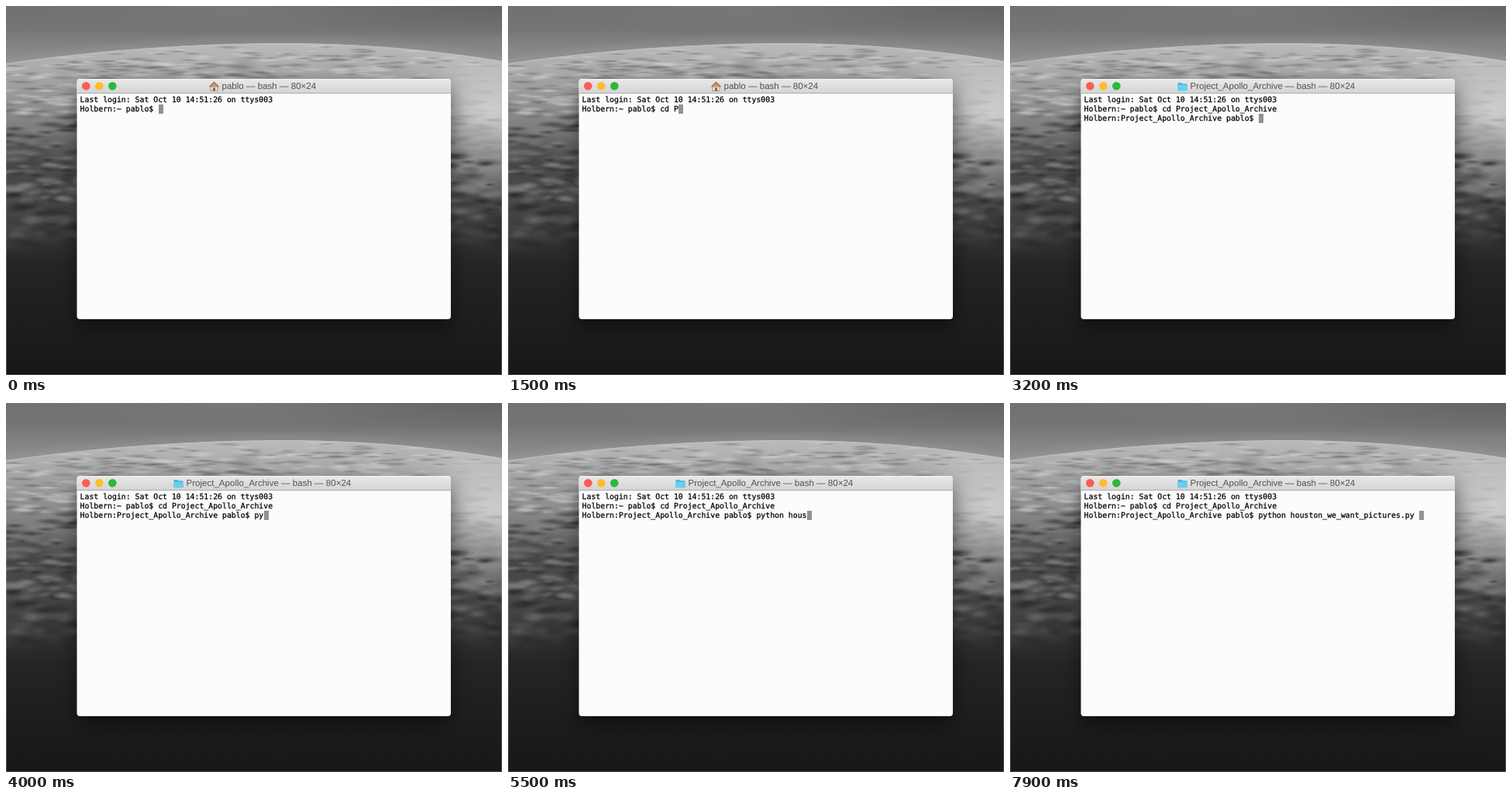
An HTML page with a canvas that plays this animation: 640 px wide and 476 px high, repeating every 8 s.

```html
<!DOCTYPE html>
<html lang="en">
<head>
<meta charset="utf-8">
<title>Terminal</title>
<style>
html, body { margin: 0; width: 100%; height: 100%; overflow: hidden; background: #181818; }
#stage { position: relative; width: 640px; height: 476px; overflow: hidden; }
#stage > * { position: absolute; margin: 0; white-space: pre; }
#scene { left: 0; top: 0; }
#title {
  top: 97px; color: #505050;
  font: 11.55px/14px "Liberation Sans", Arial, sans-serif;
  text-rendering: geometricPrecision;
}
#term {
  left: 95.6px; top: 116px; color: #000;
  font: 9.83px/12px "DejaVu Sans Mono", monospace;
  text-rendering: geometricPrecision;
  -webkit-text-stroke: .25px #000;
}
#cursor { width: 6px; height: 12px; background: #929292; }
#icon { top: 97px; left: 0; }
</style>
</head>
<body>
<div id="stage">
  <canvas id="scene" width="640" height="476"></canvas>
  <svg id="icon" width="300" height="14" viewBox="0 0 300 14">
    <g id="home">
      <path d="M264 7h9v5.5h-9z" fill="#eae6dc" stroke="#958570" stroke-width=".8"/>
      <path d="M262.5 7.2L268.5 1.5L274.5 7.2" fill="#c79a72" stroke="#a0704a" stroke-width="1.5"/>
      <path d="M267 8.5h3v4h-3z" fill="#8b6238"/>
    </g>
    <g id="folder">
      <path d="M216.5 3q0-1 1-1h3.5l1.5 1.2h5q1 0 1 1v7q0 1-1 1h-10q-1 0-1-1z" fill="#48b4dc"/>
      <path d="M216.5 4.8h12v6.4q0 1-1 1h-10q-1 0-1-1z" fill="#6bcdf0"/>
    </g>
  </svg>
  <div id="title"></div>
  <div id="cursor"></div>
  <pre id="term"></pre>
</div>
<script>
const LOOP = 8000, CHAR = 5.918, LEFT = 96, TOP = 115, LINE = 12;
const USER = 'pablo', HOST = 'Holbern', DIR = 'Project_Apollo_Archive';
const ENTER = 2800;
const $ = id => document.getElementById(id);

const LOGIN = 'Last login: Sat Oct 10 14:51:26 on ttys003';
const prompt = dir => `${HOST}:${dir} ${USER}$ `;

// Each command: times of the typed keys, then the moment it is completed.
const CD = {
  full: 'cd ' + DIR, done: 2100,
  keys: [900, 1100, 1300, 1500, 1700, 1900]
};
const RUN = {
  full: 'python houston_we_want_pictures.py ', done: 5900,
  keys: [3800, 4000, 4200, 4300, 4500, 4600, 4900, 5000, 5200, 5300, 5500]
};
const typed = (cmd, t) =>
  t >= cmd.done ? cmd.full : cmd.full.slice(0, cmd.keys.filter(k => k <= t).length);

function seeded(seed) {
  return () => (seed = (seed * 16807) % 2147483647) / 2147483647;
}

function fade(ctx, y0, y1, stops) {
  const g = ctx.createLinearGradient(0, y0, 0, y1);
  for (const [at, color] of stops) g.addColorStop(at, color);
  return g;
}

// Soft elliptical spot of one gray level.
function glow(ctx, x, y, rx, ry, gray, alpha) {
  const rgb = `${gray},${gray},${gray}`;
  ctx.save();
  ctx.translate(x, y);
  ctx.scale(rx, ry);
  const g = ctx.createRadialGradient(0, 0, 0, 0, 0, 1);
  g.addColorStop(0, `rgba(${rgb},${alpha})`);
  g.addColorStop(1, `rgba(${rgb},0)`);
  ctx.fillStyle = g;
  ctx.fillRect(-1, -1, 2, 2);
  ctx.restore();
}

const horizon = x => 48 + (x < 360 ? 26 * ((360 - x) / 360) ** 2 : 23 * ((x - 360) / 280) ** 2);

function tracePlanet(ctx, shift) {
  ctx.beginPath();
  ctx.moveTo(0, 476);
  for (let x = 0; x <= 640; x += 8) ctx.lineTo(x, horizon(x) + shift);
  ctx.lineTo(640, 476);
  ctx.closePath();
}

function paintPlanet(ctx) {
  const rnd = seeded(4211);
  ctx.fillStyle = fade(ctx, 0, 76, [[0, '#717171'], [.4, '#757575'], [.7, '#858585'], [1, '#8e8e8e']]);
  ctx.fillRect(0, 0, 640, 80);
  glow(ctx, 640, 0, 330, 42, 88, .5);
  glow(ctx, 300, 4, 260, 24, 132, .3);

  // thin air above the limb
  for (let i = 8; i > 0; i--) {
    tracePlanet(ctx, -i * 1.5);
    ctx.fillStyle = 'rgba(150,150,150,.05)';
    ctx.fill();
  }

  ctx.save();
  tracePlanet(ctx, 0);
  ctx.fillStyle = fade(ctx, 46, 476, [
    [0, '#bcbcbc'], [.1, '#a6a6a6'], [.2, '#8e8e8e'], [.3, '#707070'],
    [.41, '#525252'], [.52, '#444444'], [.6, '#2e2e2e'], [.68, '#242424'], [1, '#171717']
  ]);
  ctx.fill();
  ctx.clip();
  glow(ctx, 625, 135, 140, 105, 214, .9);
  glow(ctx, 605, 205, 70, 55, 150, .5);
  glow(ctx, 20, 200, 100, 45, 40, .55);

  // cloud deck: puffs flattened toward the limb
  for (let i = 0; i < 1300; i++) {
    const x = rnd() * 640;
    const depth = rnd();
    const y = horizon(x) + 2 + depth * 245;
    const size = 4 + depth * 8 * rnd() + rnd() * 4;
    const pale = rnd() < .5;
    const far = depth < .3;
    const gray = pale ? (far ? 212 : 138) : (far ? 105 : 34);
    const fog = x > 565 && y > 75 && y < 190 ? .2 : 1;
    const alpha = .55 * fog * Math.min(1, (1 - depth) * 4);
    glow(ctx, x, y, size * (2.6 - depth), size * (.3 + depth * .5), gray, alpha);
  }
  glow(ctx, 305, 78, 24, 18, 118, .4);

  ctx.strokeStyle = 'rgba(205,205,205,.5)';
  ctx.lineWidth = 1.2;
  tracePlanet(ctx, .5);
  ctx.stroke();
  ctx.restore();
}

function paintWindow(ctx) {
  const box = () => {
    ctx.beginPath();
    ctx.roundRect(91.5, 94, 482.5, 310, 4);
  };
  ctx.save();
  ctx.shadowColor = 'rgba(0,0,0,.5)';
  ctx.shadowBlur = 26;
  ctx.shadowOffsetY = 11;
  box();
  ctx.fillStyle = '#fcfcff';
  ctx.fill();
  ctx.restore();

  ctx.save();
  box();
  ctx.clip();
  ctx.fillStyle = fade(ctx, 94, 113, [[0, '#e9e9e9'], [1, '#d3d3d3']]);
  ctx.fillRect(91, 94, 484, 19);
  ctx.fillStyle = '#adadad';
  ctx.fillRect(91, 112, 484, 1);
  ctx.fillStyle = 'rgba(255,255,255,.5)';
  ctx.fillRect(91, 94, 484, 1);
  ctx.restore();

  ['#fc5c54', '#fdbd2c', '#2db83c'].forEach((color, i) => {
    ctx.beginPath();
    ctx.arc(103.3 + i * 17, 103.3, 5.3, 0, Math.PI * 2);
    ctx.fillStyle = color;
    ctx.fill();
  });
}

function render(t) {
  const inside = t >= ENTER;
  const lines = [LOGIN, prompt('~') + typed(CD, t)];
  if (inside) lines.push(prompt(DIR) + typed(RUN, t));
  const row = lines.length - 1;

  $('term').textContent = lines.join('\n');
  $('cursor').style.left = LEFT + lines[row].length * CHAR + 'px';
  $('cursor').style.top = TOP + row * LINE + 'px';
  $('title').textContent = `${inside ? DIR : USER} — bash — 80×24`;
  $('title').style.left = (inside ? 232.5 : 278.5) + 'px';
  $('home').style.display = inside ? 'none' : '';
  $('folder').style.display = inside ? '' : 'none';
}

const ctx = $('scene').getContext('2d');
paintPlanet(ctx);
paintWindow(ctx);

function tick() {
  render(performance.now() % LOOP);
  requestAnimationFrame(tick);
}
tick();
</script>
</body>
</html>
```
